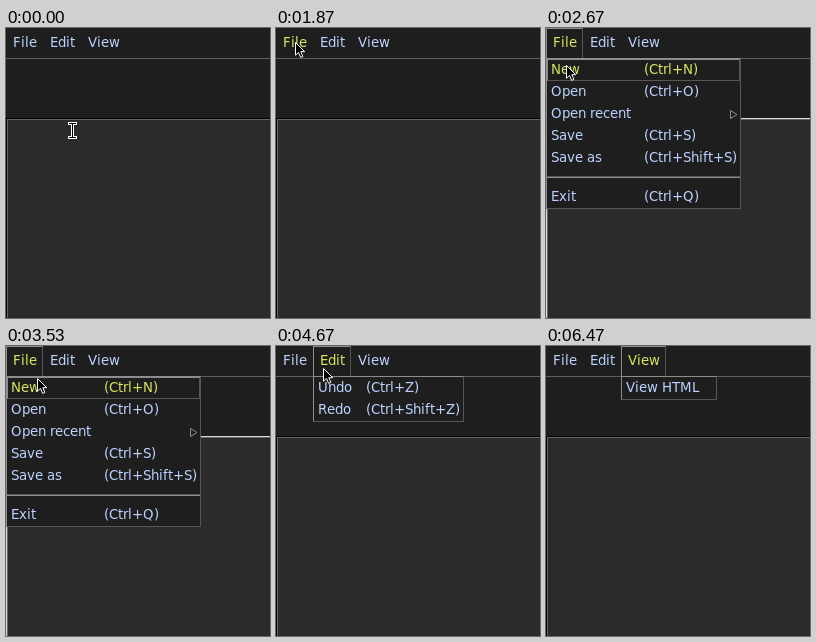
An HTML page that plays this animation: 264 by 290 pixels, repeating every 6.94 s.

```html
<!DOCTYPE html>
<html lang="en">
<head>
<meta charset="utf-8">
<title>Menu bar</title>
<style>
  :root {
    --bar: #1e1e1e; --light: #8e8e8e; --dark: #565656;
    --text: #bcd2ff; --hot: #d9e65a;
  }
  html, body { margin: 0; width: 100%; height: 100%; overflow: hidden; background: var(--bar); }
  #stage {
    position: relative; width: 264px; height: 290px; overflow: hidden;
    background: var(--bar); color: var(--text);
    font: 10pt "DejaVu Sans", sans-serif; white-space: pre;
  }
  #stage * { box-sizing: border-box; }
  #stage div, #stage span, #stage svg { position: absolute; }
  #stage i { display: inline-block; font-style: normal; }

  .rule { left: 0; top: 30px; width: 264px; height: 1px; background: #5e5e5e; }
  .editor {
    left: 0; top: 90px; width: 264px; height: 200px; background: #2b2b2b;
    border: solid #000; border-width: 1px 0 0 1px;
  }
  .editor div { inset: 0; border: solid #666; border-width: 1px 0 0 1px; }
  .label { line-height: 29px; top: 0; }

  .raised { border: 1px solid; border-color: var(--light) var(--dark) var(--dark) var(--light); }
  .menu { top: 0; opacity: 0; }
  .head { left: 0; top: 0; height: 31px; background: var(--bar); color: var(--hot); }
  .head .label { left: 6px; top: -1px; }
  .drop { left: 0; top: 30px; background: var(--bar); }
  .item { left: 4px; line-height: 21px; }
  .item span { left: var(--key); top: 0; }
  .active { left: 0; top: 0; width: 193px; height: 22px; }
  .active .item { top: -1px; left: 3px; color: var(--hot); }
  .sep {
    left: 0; top: 117px; width: 193px; height: 2px;
    background: var(--light); border-top: 1px solid var(--dark);
  }

  /* every part shares one clock */
  .anim { animation: 6940ms step-end infinite; }
  #pointer { left: 0; top: 0; animation-name: move; }
  #beam { animation-name: beam; }
  #arrow { animation-name: arrow; }
  #hover { animation-name: hover; }
  #focus { animation-name: focus; }
  #file { left: 0; animation-name: file; --key: 93px; }
  #edit { left: 37px; animation-name: edit; --key: 48px; }
  #view { left: 75px; animation-name: view; }

  @keyframes move {
    0% { transform: translate(67px, 103px); }
    6.73% { transform: translate(67px, 103px); animation-timing-function: steps(3, jump-start); }
    9.61% { transform: translate(56px, 91px); }
    12.49% { transform: translate(56px, 91px); animation-timing-function: steps(4, jump-start); }
    16.34% { transform: translate(6px, 47px); }
    20.14% { transform: translate(2px, 36px); }
    23.03% { transform: translate(2px, 36px); animation-timing-function: steps(5, jump-start); }
    27.83% { transform: translate(19px, 14px); }
    35.53% { transform: translate(19px, 14px); animation-timing-function: steps(4, jump-start); }
    39.38% { transform: translate(20px, 37px); }
    47% { transform: translate(20px, 37px); animation-timing-function: steps(5, jump-start); }
    51.81% { transform: translate(31px, 32px); animation-timing-function: steps(4, jump-start); }
    55.65% { transform: translate(43px, 23px); }
    67.23% { transform: translate(47px, 22px); }
    68.19% { transform: translate(47px, 22px); animation-timing-function: steps(6, jump-start); }
    73.96% { transform: translate(95px, 18px); }
    90.29% { transform: translate(95px, 18px); animation-timing-function: steps(3, jump-start); }
    93.17% { transform: translate(22px, 274px); }
    100% { transform: translate(67px, 103px); }
  }
  @keyframes beam { 0% { opacity: 1; } 12.49%, 100% { opacity: 0; } }
  @keyframes arrow {
    0%, 20.14%, 93.17%, 100% { opacity: 0; }
    12.49%, 23.03% { opacity: 1; }
  }
  @keyframes hover {
    0%, 51.81%, 100% { color: var(--text); }
    23.99% { color: var(--hot); }
  }
  @keyframes focus {
    0%, 51.81%, 100% { border-color: #000; }
    28.79% { border-color: #d9d9d9; }
  }
  @keyframes file { 0%, 51.81%, 100% { opacity: 0; } 28.79% { opacity: 1; } }
  @keyframes edit { 0%, 71.07%, 100% { opacity: 0; } 51.81% { opacity: 1; } }
  @keyframes view { 0% { opacity: 0; } 71.07%, 100% { opacity: 1; } }
</style>
</head>
<body>
<div id="stage">
  <div class="rule"></div>
  <div id="focus" class="editor anim"><div></div></div>

  <span id="hover" class="label anim" style="left:7px">File</span>
  <span class="label" style="left:44px">Edit</span>
  <span class="label" style="left:82px">View</span>

  <div id="file" class="menu anim">
    <div class="head raised" style="width:37px"><span class="label">File</span></div>
    <div class="drop raised" style="width:195px;height:151px">
      <div class="active raised"><div class="item">New<span>(Ctrl+N)</span></div></div>
      <div class="item" style="top:22px">Open<span>(Ctrl+O)</span></div>
      <div class="item" style="top:44px">Open recent</div>
      <svg style="left:182px;top:50px" width="10" height="11">
        <path d="M1.5 1.5V9.5L8 5.5Z" fill="none" stroke="#8e8e8e"/>
      </svg>
      <div class="item" style="top:66px">Save<span>(Ctrl+S)</span></div>
      <div class="item" style="top:88px">Save as<span>(Ctrl+Shift+S)</span></div>
      <div class="sep"></div>
      <div class="item" style="top:127px">Exit<span>(Ctrl+Q)</span></div>
    </div>
  </div>

  <div id="edit" class="menu anim">
    <div class="head raised" style="width:38px"><span class="label">Edit</span></div>
    <div class="drop raised" style="width:151px;height:46px">
      <div class="item" style="top:0">Undo<span>(Ctrl+Z)</span></div>
      <div class="item" style="top:22px">Redo<span>(Ctrl+Shift+Z)</span></div>
    </div>
  </div>

  <div id="view" class="menu anim">
    <div class="head raised" style="width:45px"><span class="label">View</span></div>
    <div class="drop raised" style="width:96px;height:24px">
      <div class="item" style="top:0">View HTML</div>
    </div>
  </div>

  <svg id="pointer" class="anim" width="12" height="18" overflow="visible">
    <g id="beam" class="anim" fill="none" stroke-linecap="square">
      <path d="M-3.5 -7.5h6M-.5 -7.5v14M-3.5 6.5h6" stroke="#fff" stroke-width="3"/>
      <path d="M-3.5 -7.5h6M-.5 -7.5v14M-3.5 6.5h6" stroke="#000"/>
    </g>
    <path id="arrow" class="anim" d="M.5 .5V13.2L3.5 10.4L5.7 15.4L7.9 14.5L5.8 9.7H9.7Z" fill="#000" stroke="#fff"/>
  </svg>
</div>
<script>
  // Whole-pixel letter advances, as hinted interface text has.
  function snapLetters(node) {
    const letters = [...node.data].map(ch => {
      const el = document.createElement('i');
      el.textContent = ch;
      return el;
    });
    node.replaceWith(...letters);
    for (const el of letters) {
      el.style.width = Math.round(el.getBoundingClientRect().width) + 'px';
    }
  }

  for (const el of document.querySelectorAll('.label, .item, .item span')) {
    [...el.childNodes].filter(n => n.nodeType === Node.TEXT_NODE).forEach(snapLetters);
  }
</script>
</body>
</html>
```
